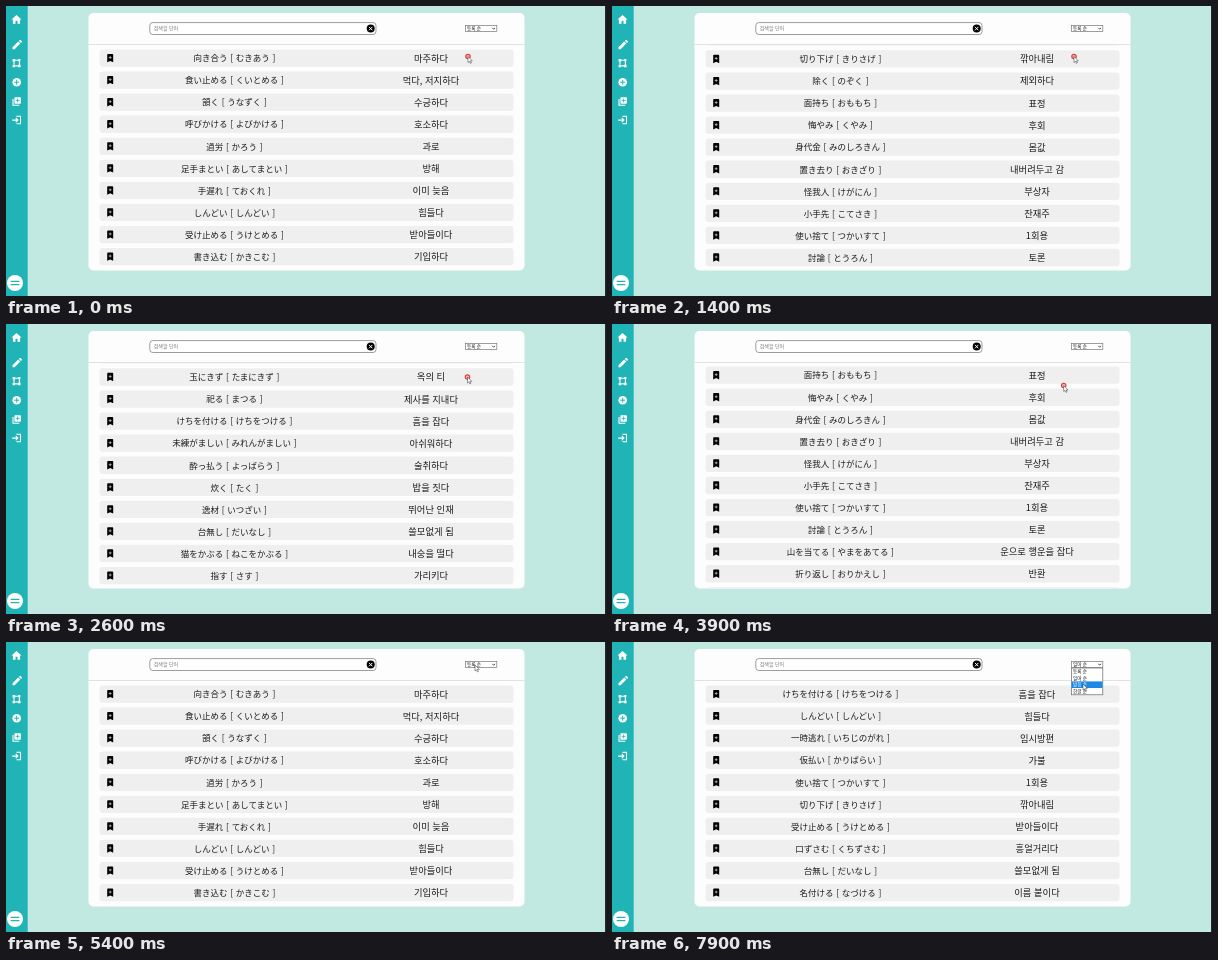
Recreate the animation shown at these times as an HTML page. Size 600 by 290 pixels, loop 8000 ms.

```html
<!DOCTYPE html>
<html lang="ko">
<head>
<meta charset="utf-8">
<title>단어장</title>
<style>
  html, body { margin: 0; width: 100%; height: 100%; overflow: hidden; background: #c1e9e1; }
  svg { display: block; width: 600px; height: 290px; }
  text { font-family: "Noto Sans CJK KR", "Noto Sans CJK", "Noto Sans", sans-serif; fill: #1c1c1c; }
  .ja { font: 8.5px "Noto Sans CJK JP", "Noto Sans CJK", "Noto Sans", sans-serif; word-spacing: .8px; text-anchor: middle; }
  .ko { font-size: 9.3px; text-anchor: middle; }
  .small { font-size: 4.6px; }
  .icon { fill: #fff; }
  .line { fill: none; stroke: #fff; stroke-width: 1.1; }
</style>
</head>
<body>
<svg viewBox="0 0 600 290" xmlns="http://www.w3.org/2000/svg">
  <defs>
    <clipPath id="view"><path d="M82.5 38.8H518.5V259.5a5 5 0 0 1-5 5H87.5a5 5 0 0 1-5-5Z"/></clipPath>
  </defs>
  <rect width="600" height="290" fill="#c1e9e1"/>
  <rect width="21.7" height="290" fill="#20b4b6"/>
  <rect x="599" width="1" height="290" fill="#1d2b2a"/>

  <g id="sidebar">
    <path class="icon" d="M10.5 9l5 4.6h-1.4v4.2h-2.6v-3h-2v3H6.900v-4.200H5.500Z"/>
    <path class="icon" d="M6.500 41.200l5.700-5.700 2.100 2.100-5.700 5.700H6.500ZM12.900 34.900l.8-.8q.5-.4 1 0l1.100 1.100q.4.500 0 1l-.8.800Z"/>
    <path class="line" d="M8 54.300h5.400v5.600H8Z"/>
    <path class="icon" d="M6.600 53h2.600v2.400H6.600ZM12.200 53h2.200v2.200h-2.200ZM6.600 59h2.400v2.200H6.600ZM12 58.800h2.600v2.400H12Z"/>
    <circle class="icon" cx="10.700" cy="76.200" r="4.300"/>
    <path d="M10.700 73.800v4.800M8.300 76.200h4.800" stroke="#20b4b6" stroke-width="1"/>
    <path class="line" d="M7 93v6.300h6.300"/>
    <rect class="icon" x="8.400" y="91.200" width="6.500" height="6.500" rx=".7"/>
    <path d="M11.600 92.500v3.900M9.700 94.400h3.900" stroke="#20b4b6" stroke-width=".8"/>
    <path class="line" d="M10.500 110.400h4v7.400h-4M6.200 114.100h5.600M9.700 111.900l2.200 2.200-2.200 2.200"/>
    <circle class="icon" cx="9" cy="277" r="8"/>
    <path d="M4.700 275.300h8.700M4.700 278.700h8.700" stroke="#20b4b6" stroke-width="1.300"/>
  </g>

  <rect x="82.500" y="7" width="436" height="257.500" rx="5" fill="#fefdfe"/>
  <g clip-path="url(#view)">
    <g id="added"></g>
    <g id="sorted"></g>
  </g>
  <path d="M82.500 38.500h436" stroke="#dcdcdc" stroke-width=".8"/>

  <rect x="143.800" y="16.600" width="226.200" height="11.900" rx="3" fill="#fff" stroke="#858585" stroke-width=".8"/>
  <text class="small" style="font-size:5px;fill:#777" x="147.700" y="24.200">검색할 단어</text>
  <circle cx="364.700" cy="22.600" r="4" fill="#000"/>
  <path d="M363 20.900l3.400 3.400m0-3.400l-3.400 3.400" stroke="#fff" stroke-width="1"/>

  <rect id="box" x="459.400" y="19.400" width="31.400" height="6.200" fill="#fff"/>
  <text id="label" class="small" x="461" y="24.200"></text>
  <path d="M486.300 21.800l1.400 1.400 1.400-1.400" fill="none" stroke="#222" stroke-width=".8"/>
  <g id="menu">
    <rect x="459.400" y="26" width="31.400" height="26.800" fill="#fff" stroke="#666" stroke-width=".7"/>
    <rect id="bar" x="459.700" width="30.800" height="6.600" fill="#1e88e5"/>
  </g>

  <g id="cursor">
    <circle id="ring" r="2.200" fill-opacity=".35" stroke-width="1.200"/>
    <path d="M0 0v6l1.400-1.200 1 2.100 1-.5-1-2h1.900Z" fill="#fff" stroke="#333" stroke-width=".5"/>
  </g>
</svg>
<script>
const LOOP = 8000, TICK = 100, PITCH = 22.06, MENU_TOP = 26.2, ITEM = 6.6;
const ORDERS = ['등록 순', '일어 순', '발음 순', '한글 순'];

const words = `向き合う,むきあう,마주하다
食い止める,くいとめる,먹다, 저지하다
頷く,うなずく,수긍하다
呼びかける,よびかける,호소하다
過労,かろう,과로
足手まとい,あしてまとい,방해
手遅れ,ておくれ,이미 늦음
しんどい,しんどい,힘들다
受け止める,うけとめる,받아들이다
書き込む,かきこむ,기입하다
執り行う,とりおこなう,거행하다
番号札,ばんごうふだ,번호표
一時逃れ,いちじのがれ,임시방편
仮払い,かりばらい,가불
口ずさむ,くちずさむ,흥얼거리다
名付ける,なづける,이름 붙이다
慌てる,あわてる,당황하다
切り下げ,きりさげ,깎아내림
除く,のぞく,제외하다
面持ち,おももち,표정
悔やみ,くやみ,후회
身代金,みのしろきん,몸값
置き去り,おきざり,내버려두고 감
怪我人,けがにん,부상자
小手先,こてさき,잔재주
使い捨て,つかいすて,1회용
討論,とうろん,토론
山を当てる,やまをあてる,운으로 행운을 잡다
折り返し,おりかえし,반환
見逃す,みのがす,놓치다
根回し,ねまわし,사전 교섭
気配,けはい,기척
眺める,ながめる,바라보다
程遠い,ほどとおい,거리가 멀다
裏切る,うらぎる,배신하다
頼もしい,たのもしい,믿음직하다
玉にきず,たまにきず,옥의 티
祀る,まつる,제사를 지내다
けちを付ける,けちをつける,흠을 잡다
未練がましい,みれんがましい,아쉬워하다
酔っ払う,よっぱらう,술취하다
炊く,たく,밥을 짓다
逸材,いつざい,뛰어난 인재
台無し,だいなし,쓸모없게 됨
猫をかぶる,ねこをかぶる,내숭을 떨다
指す,さす,가리키다`.split('\n').map(line => {
  const [word, kana, ...meaning] = line.split(',');
  return { word, kana, meaning: meaning.join(',') };
});

const $ = id => document.getElementById(id);

function row({ word, kana, meaning }, i) {
  return `<g transform="translate(0 ${52 + i * PITCH})">
    <rect x="93.500" y="-8.600" width="414" height="17.300" rx="3" fill="#f0eff0"/>
    <path d="M101.200 -3.300q0-.8.800-.8h4.400q.8 0 .8.800v7.600l-3-1.400-3 1.400Z" fill="#000"/>
    <path d="M104.200 -1.900v2.800M102.800 -.5h2.800" stroke="#ddd" stroke-width=".7"/>
    <text class="ja" lang="ja" x="228.400" y="3.300">${word} [ ${kana} ]</text>
    <text class="ko" x="425" y="3.500">${meaning}</text></g>`;
}

const byWord = (a, b) => (a.word < b.word ? -1 : 1);
$('added').innerHTML = words.map(row).join('');
$('sorted').innerHTML = [...words].sort(byWord).slice(0, 11).map(row).join('');
$('menu').insertAdjacentHTML('beforeend', ORDERS.map((name, i) =>
  `<text class="small" x="461" y="${MENU_TOP + 5 + i * ITEM}">${name}</text>`).join(''));
const items = [...$('menu').querySelectorAll('text')];

// [time, value...]
const scroll = [[0, 0], [900, 0], [1400, 374.1], [1900, 560], [2500, 793.2], [2800, 793.2],
  [3900, 420], [4500, 30.5], [4600, 0]];
const pointer = [[0, 462, 50.5], [2400, 462, 50.5], [2600, 461.5, 53], [2800, 461.5, 53],
  [3300, 451.7, 61.5], [4700, 451.7, 61.5], [5400, 469, 23], [5800, 469, 23],
  [6200, 469, 36.5], [6600, 469, 36.5], [7100, 470, 22.5], [7300, 470, 22.5], [7800, 471, 42]];

function at(track, t) {
  const next = track.findIndex(k => k[0] > t);
  if (next < 0) return track[track.length - 1].slice(1);
  const a = track[next - 1], b = track[next];
  const p = (t - a[0]) / (b[0] - a[0]);
  return a.slice(1).map((v, i) => v + (b[i + 1] - v) * p);
}

const within = (t, from, to) => t >= from && t < to;

function draw(t) {
  const [offset] = at(scroll, t);
  const [x, y] = at(pointer, t);
  const isSorted = t >= 6400;
  const open = within(t, 5600, 6400) || t >= 7200;
  const focused = within(t, 5500, 5600) || within(t, 6400, 7200);
  const chosen = isSorted ? 1 : 0;

  $('added').style.display = isSorted ? 'none' : '';
  $('sorted').style.display = isSorted ? '' : 'none';
  $('added').setAttribute('transform', `translate(0 ${-offset})`);

  $('label').textContent = ORDERS[chosen];
  $('box').setAttribute('stroke', focused ? '#111' : '#777');
  $('box').setAttribute('stroke-width', focused ? 1.1 : .7);

  const hover = y > MENU_TOP ? Math.min(3, Math.floor((y - MENU_TOP) / ITEM)) : chosen;
  $('menu').style.display = open ? '' : 'none';
  $('bar').setAttribute('y', MENU_TOP + hover * ITEM);
  items.forEach((item, i) => { item.style.fill = i === hover ? '#fff' : '#1c1c1c'; });

  const clicking = within(t, 5500, 5700) || within(t, 6300, 6600) || within(t, 7100, 7300);
  const color = t < 4700 ? '#e2403c' : '#3cc4e0';
  $('cursor').setAttribute('transform', `translate(${x} ${y})`);
  $('ring').style.display = t < 4700 || clicking ? '' : 'none';
  $('ring').setAttribute('fill', color);
  $('ring').setAttribute('stroke', color);
}

const start = performance.now();
function frame() {
  const t = (performance.now() - start) % LOOP;
  draw(Math.floor(t / TICK) * TICK);
  requestAnimationFrame(frame);
}
frame();
</script>
</body>
</html>
```
